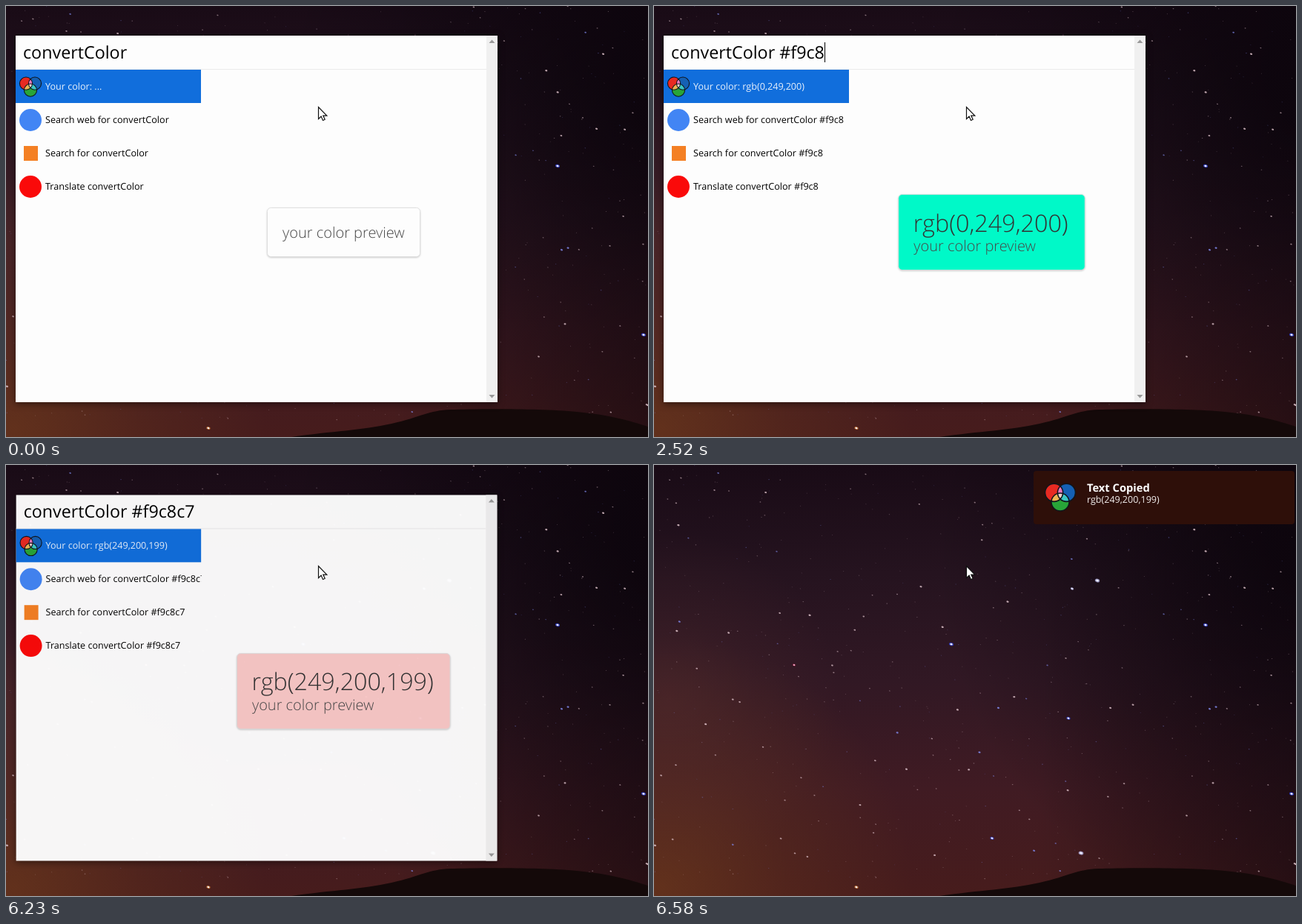
Write an HTML page with a canvas that moves like this. It is 866x582 px and loops after 8000 ms.

```html
<!DOCTYPE html>
<html lang="en">
<head>
<meta charset="utf-8">
<title>Color converter</title>
<style>
  html, body { margin: 0; width: 100%; height: 100%; overflow: hidden; background: #180b16; }
  canvas, svg { position: absolute; left: 0; top: 0; width: 866px; height: 582px; }
  text { font-family: "Open Sans", "Noto Sans", sans-serif; white-space: pre; text-rendering: geometricPrecision; }
  .row { font-size: 12.6px; font-weight: 450; }
  .light { font-weight: 340; }
  .mix { isolation: isolate; }
  .mix circle { mix-blend-mode: screen; }
  #query { font-size: 23.3px; font-weight: 450; }
  #panel { filter: drop-shadow(0 2px 5px rgba(0, 0, 0, .5)); }
  #card { filter: drop-shadow(0 1px 1px rgba(0, 0, 0, .2)); }
</style>
</head>
<body>
<canvas id="sky" width="866" height="582"></canvas>
<svg viewBox="0 0 866 582">
  <defs>
    <g id="rgbIcon">
      <g class="mix">
        <circle cx="-6" cy="-4.4" r="8.6" fill="#e82a22"/>
        <circle cx="6" cy="-4.4" r="8.6" fill="#1560b4"/>
        <circle cy="4.6" r="8.6" fill="#28a538"/>
      </g>
      <g fill="none" stroke="#10151c" stroke-width="1.1">
        <circle cx="-6" cy="-4.4" r="8.6"/>
        <circle cx="6" cy="-4.4" r="8.6"/>
        <circle cy="4.6" r="8.6"/>
      </g>
    </g>
    <clipPath id="listClip"><rect x="13" y="86" width="250.5" height="180"/></clipPath>
  </defs>

  <g id="win">
    <rect id="panel" x="13" y="40" width="650" height="495" fill="#fdfdfd"/>
    <path d="M13 85.5H648" stroke="#ebebeb"/>
    <rect x="648" y="40" width="15" height="495" fill="#f0f0f0"/>
    <path d="M651.5 50l4-4.5 4 4.5zM651.5 525l4 4.5 4-4.5z" fill="#999"/>
    <text id="query" x="23" y="71"></text>
    <rect id="caret" y="49" width="1" height="27"/>
    <rect x="13" y="86" width="250" height="45" fill="#116edc"/>
    <use href="#rgbIcon" x="33" y="109"/>
    <circle cx="33" cy="154" r="15" fill="#4285f4"/>
    <rect x="24" y="189" width="19" height="20" fill="#f48024"/>
    <circle cx="33" cy="244" r="15" fill="#fa0a0a"/>
    <g clip-path="url(#listClip)">
      <text class="row" x="53" y="113" fill="#e8f1fc"></text>
      <text class="row" x="53" y="158"></text>
      <text class="row" x="53" y="203"></text>
      <text class="row" x="53" y="248"></text>
    </g>
    <rect id="card" rx="5" stroke="#ddd" stroke-opacity=".8"/>
    <text id="value" class="light" y="304.5" font-size="32.3" fill="#333"></text>
    <text id="caption" class="light" font-size="20" fill="#484848">your color preview</text>
  </g>

  <g id="toast">
    <rect x="512" y="8" width="352" height="72" rx="4" fill="#2e0f09"/>
    <use href="#rgbIcon" transform="translate(548 43.5) scale(1.4)"/>
    <text x="584" y="36" font-size="14.7" font-weight="700" fill="#fff">Text Copied</text>
    <text x="584" y="51" font-size="12.55" fill="#f2eeed">rgb(249,200,199)</text>
  </g>

  <path d="M421.5 136.5v16l3.6-3.4 2.4 5.4 2.7-1.2-2.4-5.2h5z" fill="#fff" stroke="#111" stroke-width="1.2"/>
</svg>

<script>
const LOOP = 8000, STEP = 70, BLINK = 520;
const $ = id => document.getElementById(id);
const clamp = v => Math.min(1, Math.max(0, v));
const set = (el, attrs) => { for (const k in attrs) el.setAttribute(k, attrs[k]); };

function paintSky() {
  const c = $('sky').getContext('2d'), W = 866, H = 582;
  const wash = (gradient, ...colors) => {
    colors.forEach((color, i) => gradient.addColorStop(i / (colors.length - 1), color));
    c.fillStyle = gradient;
    c.fillRect(0, 0, W, H);
  };
  const glow = (x, y, r, rgb, alpha) =>
    wash(c.createRadialGradient(x, y, 0, x, y, r), `rgba(${rgb},${alpha})`, `rgba(${rgb},${alpha * .4})`, `rgba(${rgb},0)`);
  wash(c.createLinearGradient(0, 0, 0, H), '#190b16', '#25131f', '#311824', '#401b23', '#471c1c');
  glow(900, 120, 520, '7,3,11', .9);
  glow(10, 570, 340, '112,60,28', .65);
  glow(20, 320, 230, '92,48,46', .4);
  wash(c.createLinearGradient(520, 0, W, 0), 'rgba(14,5,12,0)', 'rgba(14,5,12,.5)');

  const star = (x, y, r, rgb, alpha) => {
    c.fillStyle = `rgba(${rgb},${alpha})`;
    c.beginPath();
    c.ellipse(x, y, r * 1.2, r * .85, .3, 0, 7);
    c.fill();
  };
  const brightStar = (x, y, r, rgb) => {
    star(x, y, r * 1.35, rgb, .75);
    star(x, y, r * .75, '240,240,255', 1);
  };

  // Many faint stars, few strong ones
  let seed = 41;
  const rnd = () => (seed = seed * 16807 % 2147483647) / 2147483647;
  for (let i = 0; i < 620; i++) {
    const power = rnd() ** 5;
    const rgb = rnd() < .25 ? '130,140,240' : '228,200,208';
    star(rnd() * W, rnd() * 560, .5 + power * .9, rgb, .25 + power * .6);
  }
  const blue = '55,75,235', white = '190,190,240';
  brightStar(401, 242, 1.9, blue);
  brightStar(744, 216, 1.9, blue);
  brightStar(860, 444, 1.9, blue);
  brightStar(559, 342, 1.7, blue);
  brightStar(456, 504, 1.7, blue);
  brightStar(576, 524, 2.1, white);
  brightStar(598, 156, 2, white);
  brightStar(564, 167, 1.4, white);
  brightStar(189, 270, 1.2, '225,50,95');
  brightStar(273, 570, 1.7, '230,135,55');

  c.fillStyle = '#140909';
  c.fill(new Path2D('M385 582C440 574 480 573 520 564S570 546 600 545S720 543 770 548S840 560 866 568V582Z'));
}

const HEX = '#f9c8c7';
const KEY_TIMES = [70, 560, 770, 1190, 1470, 3080, 3290];
const rows = document.querySelectorAll('.row');

// Three digits are doubled; other lengths are read as one number
function toRgb(digits) {
  if (!digits) return '';
  const full = digits.length === 3 ? digits.replace(/./g, '$&$&') : digits;
  const n = parseInt(full, 16);
  return `rgb(${n >> 16},${n >> 8 & 255},${n & 255})`;
}

function showTyped(count) {
  const typed = HEX.slice(0, count), color = toRgb(typed.slice(1));
  const query = 'convertColor' + (typed && ' ' + typed);
  $('query').textContent = query;
  ['Your color: ' + (color || '...'), 'Search web for ' + query, 'Search for ' + query, 'Translate ' + query]
    .forEach((label, i) => rows[i].textContent = label);
  set($('caret'), { x: Math.round(23 + $('query').getComputedTextLength()) });

  const width = Math.max(206, 18.3 * color.length - 4.8);
  const x = 455.5 - width / 2;
  set($('card'), { x, width, y: color ? 254.5 : 272.5, height: color ? 102 : 66, fill: color || '#fdfdfd' });
  $('value').textContent = color;
  set($('value'), { x: x + 20 });
  set($('caption'), { x: x + 20.5, y: color ? 331 : 313 });
}

const easeInOut = p => p < .5 ? 2 * p * p : 1 - 2 * (1 - p) ** 2;
let shown;

function render() {
  const t = Math.floor(performance.now() % LOOP / STEP) * STEP;
  const count = KEY_TIMES.filter(at => at <= t).length;
  if (count !== shown) showTyped(shown = count);
  const sinceKey = t - KEY_TIMES[count - 1] + 30;
  set($('caret'), { opacity: count && Math.floor(sinceKey / BLINK) % 2 === 0 ? 1 : 0 });

  const closing = easeInOut(clamp((t - 6201) / 236));
  set($('win'), {
    opacity: 1 - closing,
    transform: `translate(338 287.5) scale(${1 - .067 * closing}) translate(-338 -287.5)`
  });
  set($('toast'), { opacity: clamp((t - 6340) / 240) });
  requestAnimationFrame(render);
}

paintSky();
render();
</script>
</body>
</html>
```
